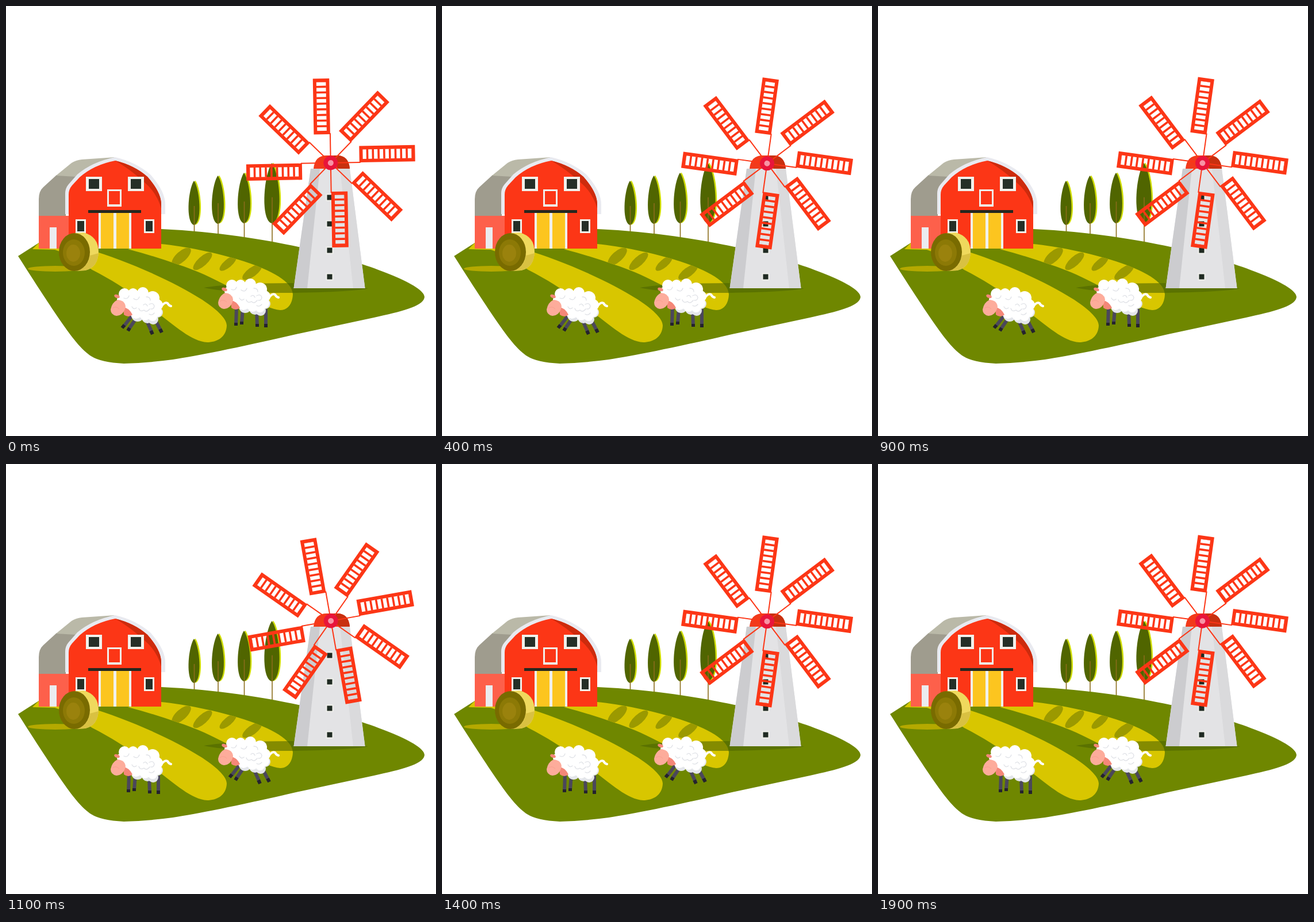
These frames come from a looping animation (748x748 px, 2000 ms). An HTML page:

```html
<!DOCTYPE html>
<html lang="en">
<head>
<meta charset="utf-8">
<title>Farm with windmill</title>
<style>
  html, body { margin: 0; height: 100%; overflow: hidden; background: #fff; }
  svg { display: block; width: 100%; height: 100%; }
</style>
</head>
<body>
<svg viewBox="0 0 748 748">
  <defs>
    <clipPath id="fieldClip"><use href="#field"/></clipPath>

    <g id="blade" fill="none" stroke="#fc3616">
      <path d="M10 0H52" stroke-width="2"/>
      <rect x="53" y="-25.5" width="91" height="22.5" stroke-width="6"/>
      <path d="M56 -14.2H141" stroke-width="17" stroke-dasharray="3.6 6.2" stroke-dashoffset="3.6"/>
    </g>

    <g id="window">
      <path d="M-6.500 -6.500h13v13h-13z" fill="#efefea"/>
      <path d="M-4.500 -4.500h9v9h-9z" fill="#1f2a22"/>
    </g>

    <g id="sheepBody">
      <path d="M270 523Q276 514 281 517Q283 521 287 522" fill="none" stroke="#fff" stroke-width="4" stroke-linecap="round"/>
      <g fill="#e4e6ea">
        <circle cx="229" cy="538" r="11"/><circle cx="246" cy="542" r="10"/><circle cx="256" cy="545" r="9"/><circle cx="264" cy="533" r="9"/>
      </g>
      <g fill="#fff">
        <ellipse cx="237" cy="520" rx="33" ry="22"/>
        <circle cx="206" cy="501" r="10"/><circle cx="221" cy="500" r="9"/><circle cx="238" cy="499" r="10"/>
        <circle cx="255" cy="508" r="12"/><circle cx="263" cy="520" r="10"/><circle cx="262" cy="532" r="9"/>
        <circle cx="255" cy="540" r="8"/><circle cx="242" cy="538" r="9"/><circle cx="226" cy="534" r="10"/>
        <circle cx="201" cy="511" r="8"/><circle cx="212" cy="520" r="11"/>
      </g>
      <g fill="none" stroke="#dfe1e6" stroke-width="1.300" stroke-linecap="round">
        <path d="M205 508q7 3 9 -4M222 509q7 5 10 -3M244 506q7 0 7 6M231 526q2 7 9 3q5 5 10 -2M249 519q7 -4 9 3q-1 6 -6 5M219 523q3 6 8 2M239 520q5 -4 7 2M249 536q5 3 9 -2"/>
      </g>
    </g>

    <g id="sheepHead">
      <path d="M204 524Q214 525 220 537Q213 543 205 537Z" fill="#f48778"/>
      <ellipse cx="193" cy="505" rx="5" ry="3" transform="rotate(20 193 505)" fill="#f48778"/>
      <path d="M194 511Q207 512 208 523Q205 538 192 539Q182 537 182 528Q184 516 194 511Z" fill="#fdac9b"/>
      <path d="M185 526q6 -5 12 1" fill="none" stroke="#f8a08f"/>
    </g>

    <g id="running">
      <g fill="none" stroke="#4b475b" stroke-width="6">
        <path d="M219 539L205 557M228 541L213 563M244 546L254 568M260 547L270 566"/>
      </g>
      <g fill="none" stroke="#24222d" stroke-width="6">
        <path d="M206 555L202 560M215 560L212 565M252 565L255 571M268 562L271 568"/>
      </g>
      <use href="#sheepBody"/><use href="#sheepHead"/>
    </g>

    <g id="standing">
      <g fill="none" stroke="#4b475b" stroke-width="6">
        <path d="M214 538L213 570M225 540L223 567M249 544L250 572M265 542L265 573"/>
      </g>
      <g fill="none" stroke="#24222d" stroke-width="6">
        <path d="M213 566V571M223 564V569M250 568V573M265 568V574"/>
      </g>
      <use href="#sheepBody"/><use href="#sheepHead" y="3"/>
    </g>
  </defs>

  <g id="trees"></g>

  <!-- Ground and fields -->
  <path fill="#6f8700" d="M21 435L57 412Q140 384 270 388C400 394 500 416 560 431C640 453 728 486 728 506C727 522 690 531 640 542L500 572C400 595 330 609 290 615Q245 621 205 622Q165 620 148 609C124 592 106 568 21 435Z"/>
  <path fill="#d8c600" d="M46 423L57 412H130L145 424C235 450 384 520 384 556C383 577 366 585 350 585C305 582 260 515 150 459Q110 432 85 424Z"/>
  <path id="field" fill="#d8c600" d="M212 423L270 414C350 422 500 458 499 502C498 520 489 529 477 529C440 526 380 475 300 450Q255 434 212 423Z"/>
  <g clip-path="url(#fieldClip)" fill="#9b9900">
    <ellipse cx="305" cy="436" rx="21" ry="9" transform="rotate(-42 305 436)"/>
    <ellipse cx="342" cy="444" rx="21" ry="8" transform="rotate(-42 342 444)"/>
    <ellipse cx="386" cy="448" rx="18" ry="7" transform="rotate(-40 386 448)"/>
    <ellipse cx="428" cy="463" rx="20" ry="8" transform="rotate(-36 428 463)"/>
  </g>
  <path fill="#4d6500" fill-opacity=".6" d="M344 490Q390 482 500 482L630 491Q610 497 500 499Q390 500 344 490Z"/>
  <ellipse cx="86" cy="457" rx="48" ry="5" fill="#b5a900"/>

  <!-- Barn -->
  <path fill="#9f9c8e" d="M57 366V336Q57 322 65 315L88 294H124L106 316L104 366Z"/>
  <path fill="#bab9a8" d="M87 295L114 273Q122 268 132 267L190 263Q148 276 122 297Z"/>
  <path fill="#fd604b" d="M57 365H110V422H57Z"/>
  <path fill="#ebecf0" d="M76 385H88V422H76Z"/>
  <path fill="#e9eaf0" d="M103 366V326Q103 317 109 310L124 293Q150 271 190 263Q225 271 251 293Q277 322 277 345V362H103Z"/>
  <path fill="#fc3616" d="M109 422V328Q109 319 115 312L128 298Q153 276 190 269Q223 277 246 297Q270 324 270 345V422Z"/>
  <path fill="#cd2b0d" d="M190 269Q223 277 246 297Q270 324 270 345V352Q262 324 240 306Q216 284 190 269Z"/>
  <g fill="#f1f1ec">
    <path d="M139 297h28v25h-28zM212 297h28v25h-28zM176 319h25v30h-25zM121 371h18v24h-18zM240 371h18v24h-18zM161 360h57v62h-57z"/>
  </g>
  <path fill="#252f27" d="M144 301h18v17h-18zM217 301h18v17h-18zM124 374h12v18h-12zM243 374h12v18h-12z"/>
  <path fill="#fc3616" d="M179 322h19v23h-19z"/>
  <path fill="#fcc51f" d="M165 360h22v62h-22zM192 360h22v62h-22z"/>
  <path fill="#26271f" d="M143 355h92v5h-92z"/>

  <!-- Hay bale -->
  <path fill="#efd95d" d="M118 395L135 394Q161 401 161 428Q160 455 138 460L118 461Z"/>
  <path fill="#d9c142" d="M146 434L161 430Q159 455 138 460L122 461Q143 455 146 434Z"/>
  <ellipse cx="119" cy="428" rx="27" ry="33" fill="#796b00"/>
  <ellipse cx="118" cy="429" rx="19" ry="23" fill="#8c7906"/>
  <ellipse cx="117" cy="430" rx="12" ry="15" fill="#9a820d"/>

  <!-- Mill tower -->
  <path fill="#e3e3e5" d="M530 283H598L624.500 491H500.500Z"/>
  <path fill="#cccccf" d="M530 283H546L524 491H500.500Z"/>
  <path fill="#dadadc" d="M581 283H598L624.500 491H604Z"/>
  <use href="#window" x="563" y="333"/><use href="#window" x="563" y="379"/>
  <use href="#window" x="563" y="425"/><use href="#window" x="563" y="471"/>
  <path fill="#f23a1b" d="M535 283Q537 260 558 260H576Q596 260 598 283Z"/>
  <path fill="#c8300f" d="M570 260H576Q596 260 598 283H577Z"/>

  <g id="rotor">
    <circle r="12.500" fill="#e8153b"/>
    <circle r="5" fill="#f794a6"/>
  </g>

  <use class="sheep"/>
  <use class="sheep" transform="translate(187 -15)"/>
</svg>

<script>
  const FRAME_MS = 100;
  const LOOP_FRAMES = 20;
  const rotor = document.getElementById('rotor');
  const [leftSheep, rightSheep] = document.querySelectorAll('.sheep');

  // Each tree: centre x, top, crown bottom, half width, trunk bottom.
  function tree([x, top, bottom, half, foot]) {
    const height = bottom - top;
    const crown = `M${x} ${top}C${x + half} ${top + height * .2} ${x + half * 1.4} ${bottom - 4} ${x} ${bottom}` +
      `C${x - half * 1.4} ${bottom - 4} ${x - half} ${top + height * .2} ${x} ${top}Z`;
    return `<path d="${crown}" fill="#cfdd00" transform="translate(2.500 -.5)"/>
      <path d="${crown}" fill="#506500"/>
      <path d="M${x + .5} ${top + height * .57}V${foot}" stroke="#8b6d1b" stroke-width="1.600"/>`;
  }

  document.getElementById('trees').innerHTML = [
    [327, 304, 381, 10.5, 402],
    [368.5, 295, 379, 11.5, 400],
    [414, 290, 378, 12, 406],
    [462.5, 273, 378, 14.5, 413]
  ].map(tree).join('');

  let blades = '';
  for (let angle = 0; angle < 360; angle += 45) {
    blades += `<use href="#blade" transform="rotate(${angle})"/>`;
  }
  rotor.insertAdjacentHTML('afterbegin', blades);

  function draw(now) {
    const frame = Math.floor(now / FRAME_MS) % LOOP_FRAMES;
    const angle = frame * 36 - 1;
    // The hub sits slightly off its axis, so the wheel wobbles as it turns.
    rotor.setAttribute('transform',
      `translate(565 273.5) rotate(${angle}) translate(-.2 -.6)`);

    const leftRuns = frame % 4 < 2;
    leftSheep.setAttribute('href', leftRuns ? '#running' : '#standing');
    rightSheep.setAttribute('href', leftRuns ? '#standing' : '#running');
  }

  const start = performance.now();
  function tick() {
    draw(performance.now() - start);
    requestAnimationFrame(tick);
  }
  tick();
</script>
</body>
</html>
```
